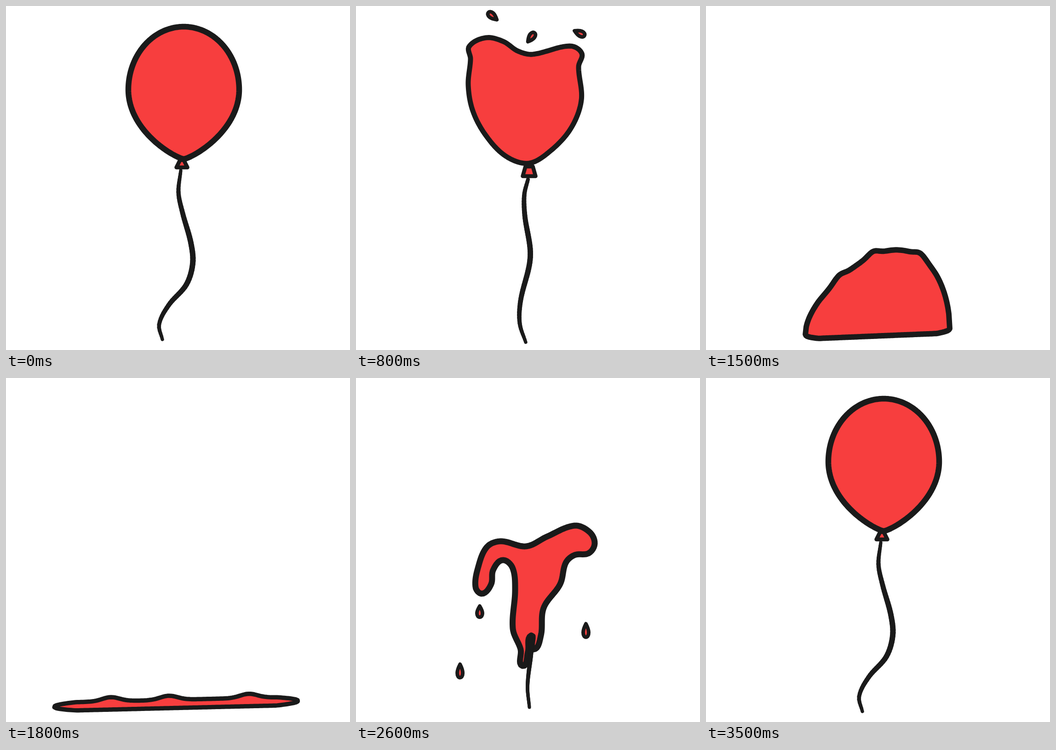
These frames come from a looping animation (748 by 748 pixels, 3600 ms). An HTML page with a canvas:

```html
<!DOCTYPE html>
<html lang="en">
<head>
<meta charset="utf-8">
<title>Melting balloon</title>
<style>
html, body { margin: 0; width: 100%; height: 100%; overflow: hidden; background: #fff; }
canvas { display: block; width: 748px; height: 748px; }
</style>
</head>
<body>
<canvas id="stage" width="748" height="748"></canvas>
<script>
const ctx = document.getElementById('stage').getContext('2d');
const INK = '#1a1a1a', RED = '#f73e3e';
const STEP = 100, STEPS = 36;

const lerp = (a, b, u) => a + (b - a) * u;
const mixPoints = (p, q, u) => p.map(([x, y], i) => [lerp(x, q[i][0], u), lerp(y, q[i][1], u)]);
const shift = (pts, dx, dy) => pts.map(([x, y]) => [x + dx, y + dy]);
const range = (n, f) => Array.from({ length: n }, (_, i) => f(i / (n - 1)));

// Spreads n points evenly along a polyline so that poses can be blended.
function resample(line, n) {
  const far = [0];
  for (let i = 1; i < line.length; i++)
    far.push(far[i - 1] + Math.hypot(line[i][0] - line[i - 1][0], line[i][1] - line[i - 1][1]));
  let i = 1;
  return range(n, u => {
    const d = u * far[far.length - 1];
    while (i < line.length - 1 && far[i] < d) i++;
    const t = (d - far[i - 1]) / (far[i] - far[i - 1] || 1);
    return [0, 1].map(k => lerp(line[i - 1][k], line[i][k], t));
  });
}

// Smooth curve through key points; handles are a third of each span.
function curve(flat, closed) {
  const n = flat.length / 2, out = [];
  const at = i => {
    const j = closed ? (i + n) % n : Math.max(0, Math.min(n - 1, i));
    return [flat[2 * j], flat[2 * j + 1]];
  };
  const slope = i => {
    const a = at(i - 1), b = at(i + 1), d = Math.hypot(b[0] - a[0], b[1] - a[1]);
    return [(b[0] - a[0]) / d, (b[1] - a[1]) / d];
  };
  for (let i = 0; i < (closed ? n : n - 1); i++) {
    const a = at(i), b = at(i + 1), s = slope(i), e = slope(i + 1);
    const arm = Math.hypot(b[0] - a[0], b[1] - a[1]);
    for (let u = 0; u <= 1; u += 1 / 16) {
      const v = 1 - u;
      out.push([0, 1].map(k => v * v * (v + 3 * u) * a[k] + u * u * (u + 3 * v) * b[k]
        + arm * u * v * (v * s[k] - u * e[k])));
    }
  }
  return out;
}

const outline = line => resample(line, 260);
const blob = flat => outline(curve(flat, true));
const cord = flat => resample(curve(flat, false), 60);

// An egg: half an ellipse above, a slightly pointed half below.
function egg(cx, cy, a, top, bottom, point) {
  return outline(range(200, u => {
    const s = Math.sin(2 * Math.PI * u), c = Math.cos(2 * Math.PI * u);
    const side = Math.sign(s) * Math.abs(s) ** (c > 0 ? point : 1);
    return [cx - a * side, cy + c * (c > 0 ? bottom : top)];
  }));
}

// A heap on the floor that spreads into a wavy puddle as melt goes to 1.
function slab(melt) {
  const x0 = lerp(216, 104, melt), x1 = lerp(530, 636, melt);
  const rise = 195 * Math.max(0, 1 - melt) ** 1.4;
  const edge = (s, side) => {
    const round = 9 * Math.sqrt(Math.min(1, 12 * s * (1 - s)));
    const hill = rise * Math.sin(Math.PI * s) ** .5 * (.55 + .55 * s);
    const waves = [.233, .47, .797].reduce((sum, c) => sum + 9 * Math.exp(-(((s - c) / .05) ** 2)), 0);
    return [lerp(x0, x1, s), lerp(715, 702, s) + side * round - (side < 0 ? hill + waves : 0)];
  };
  return outline([
    ...range(60, u => edge(.5 - u / 2, 1)),
    ...range(160, u => edge(u, -1)),
    ...range(60, u => edge(1 - u / 2, 1))
  ]);
}

// knot: half top, half bottom, height; brush: cord width at the top and its pull in the middle
const round = {
  line: 12.5,
  body: egg(386.5, 182, 120.5, 137, 151, 1.6),
  cord: cord([380,358, 375,405, 384,450, 402,515, 406,560, 392,606, 354,650, 333,692, 340,725]),
  knot: [4, 12, 16],
  brush: [7, 17]
};

const burst = {
  line: 11,
  body: blob([374,342, 325,326, 282,281, 254,228, 244,172, 249,115, 246,88, 282,69, 320,77,
    352,98, 384,105, 465,87, 491,103, 484,132, 490,205, 466,268, 418,319]),
  cord: cord([374,377, 366,410, 367,455, 379,545, 358,640, 356,690, 369,731]),
  knot: [8, 14, 21],
  brush: [8, 16]
};

const swayed = {
  ...round,
  body: shift(round.body, -14, 12),
  cord: shift(burst.cord, -7, -8)
};

const dripping = {
  line: 12,
  body: blob([375,393, 368,425, 370,500, 349,533, 340,505, 346,425, 338,372, 318,353, 302,366,
    277,387, 266,372, 249,312, 278,275, 352,267, 475,237, 508,252, 522,282, 508,303,
    476,295, 444,355, 438,403, 415,411, 394,440, 382,410]),
  cord: cord([375,394, 375,450, 368,540, 379,665, 374,722]),
  knot: [0, 0, 0],
  brush: [13, 13]
};

const sagging = {
  line: 13,
  body: blob([381,560, 374,595, 362,626, 358,590, 341,545, 346,460, 340,412, 318,396, 298,418,
    294,448, 275,469, 260,455, 266,410, 285,367, 315,355, 370,366, 415,345, 475,321,
    508,335, 519,360, 506,381, 475,385, 456,402, 444,448, 408,500, 402,560, 386,590]),
  cord: cord([381,560, 380,600, 373,670, 377,716]),
  knot: dripping.knot,
  brush: [13, 8]
};

const heap = { ...sagging, line: 12, body: slab(0) };

const poses = [[0, round], [2, swayed], [4, round], [6, swayed], [8, burst],
  [12, dripping], [13, sagging], [15, heap]];

function poseAt(k) {
  if (k >= 15) {
    const melt = Math.min(1, (k - 15) / 3);
    const slosh = k > 18 ? .15 * Math.sin(Math.PI * (k - 18) / 2.3) : 0;
    return { line: lerp(12, 9.5, melt), body: slab(melt + slosh) };
  }
  const i = poses.findIndex(p => p[0] > k);
  const [t0, a] = poses[i - 1], [t1, b] = poses[i];
  const u = (k - t0) / (t1 - t0);
  const mixList = key => a[key].map((v, j) => lerp(v, b[key][j], u));
  return {
    line: lerp(a.line, b.line, u),
    body: mixPoints(a.body, b.body, u),
    cord: mixPoints(a.cord, b.cord, u),
    knot: mixList('knot'),
    brush: mixList('brush')
  };
}

// Drops are thrown aside by dx, turn upright and fall at a steady speed.
const drops = [
  { from: 8, to: 14, x: 297, y: 22, dx: -71, fall: 123, turn: 130 },
  { from: 8, to: 14, x: 486, y: 59, dx: 14, fall: 98, turn: -65 },
  { from: 8, to: 8, x: 381, y: 68, turn: 217 },
  { from: 12, to: 12, x: 345, y: 574, turn: 0 },
  { from: 13, to: 13, x: 269, y: 508, turn: 0 }
];

function paint(width) {
  ctx.fillStyle = RED;
  ctx.strokeStyle = INK;
  ctx.lineWidth = width;
  ctx.lineJoin = ctx.lineCap = 'round';
  ctx.closePath();
  ctx.fill();
  ctx.stroke();
}

function drawShape(pts, width) {
  ctx.beginPath();
  for (const p of pts) ctx.lineTo(...p);
  paint(width);
}

function drawKnot([x, y], [top, base, height]) {
  const cx = x + 2.5, low = y - 7;
  drawShape([[cx - top, low - height], [cx - base, low], [cx + base, low], [cx + top, low - height]], 8.5);
}

function drawCord(pts, [head, pull]) {
  ctx.strokeStyle = INK;
  ctx.lineCap = 'round';
  for (let i = 1; i < pts.length; i++) {
    const u = i / pts.length, v = 1 - u;
    ctx.lineWidth = head * v * v + 2 * pull * u * v + 7 * u * u;
    ctx.beginPath();
    ctx.moveTo(...pts[i - 1]);
    ctx.lineTo(...pts[i]);
    ctx.stroke();
  }
}

function drawDrop({ from, x, y, dx = 0, fall = 0, turn }, k) {
  const age = k - from, left = .3 ** age;
  const w = 6, h = 12 + age * .5;
  ctx.save();
  ctx.translate(x + dx * (1 - left), y + fall * age);
  ctx.rotate(turn * left * Math.PI / 180);
  ctx.beginPath();
  ctx.moveTo(0, -h);
  ctx.bezierCurveTo(w * .5, -h * .6, w, -h * .1, w, h * .3);
  ctx.bezierCurveTo(w, h * .76, w * .56, h, 0, h);
  ctx.bezierCurveTo(-w * .56, h, -w, h * .76, -w, h * .3);
  ctx.bezierCurveTo(-w, -h * .1, -w * .5, -h * .6, 0, -h);
  paint(8);
  ctx.restore();
}

function draw(step) {
  // The melt runs forward, then back from the puddle.
  const k = step <= 20 ? step : 39 - step;
  const pose = poseAt(k);
  ctx.fillStyle = '#fff';
  ctx.fillRect(0, 0, 748, 748);
  for (const d of drops) if (k >= d.from && k <= d.to) drawDrop(d, k);
  drawShape(pose.body, pose.line);
  if (k < 12) drawKnot(pose.cord[0], pose.knot);
  if (k < 14) drawCord(pose.cord, pose.brush);
}

const start = performance.now();
function tick() {
  draw(Math.floor((performance.now() - start) / STEP) % STEPS);
  requestAnimationFrame(tick);
}
tick();
</script>
</body>
</html>
```
